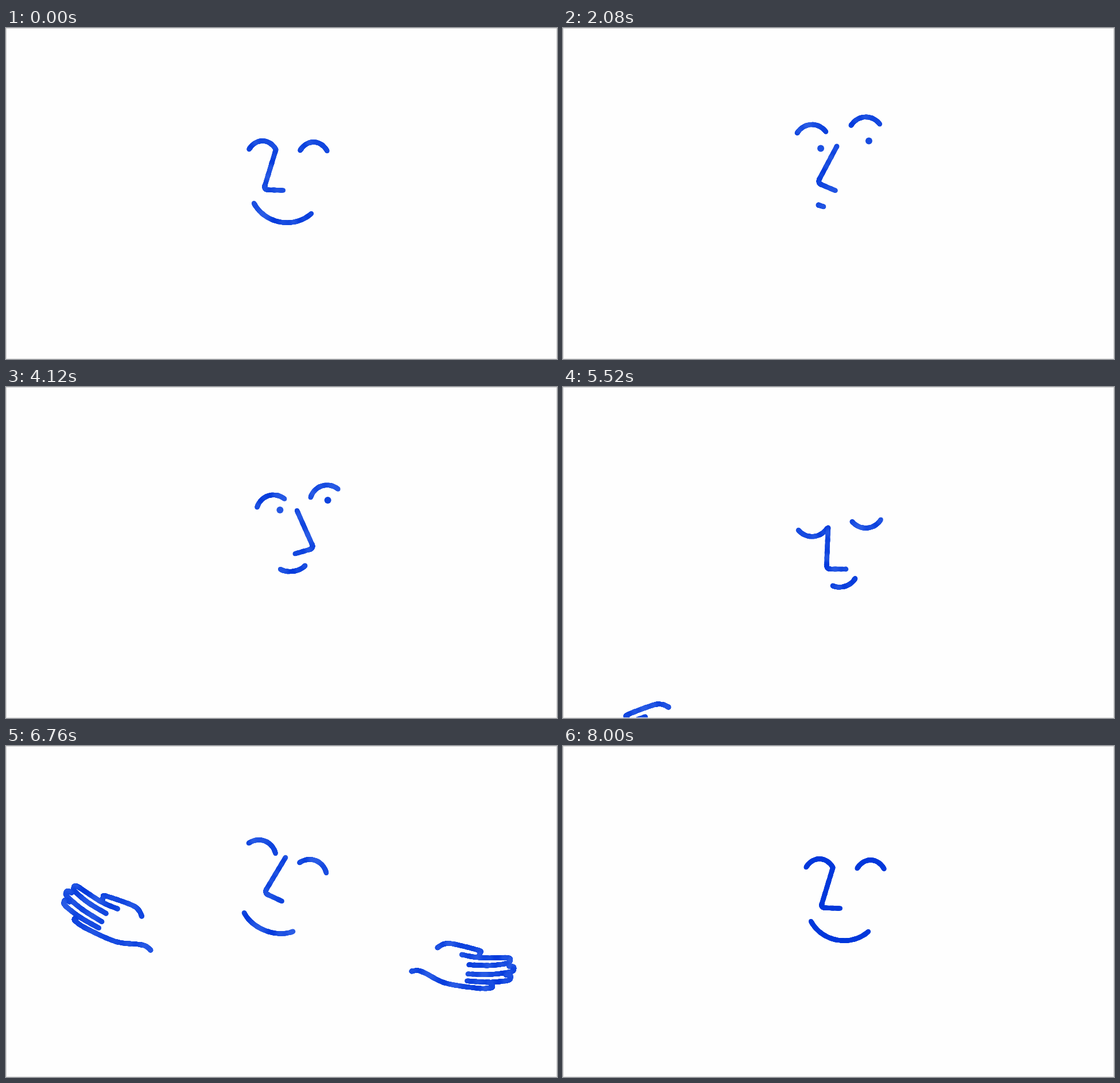
Recreate the animation shown at these times as an HTML page with a canvas. Size 960x576 px, loop 8040 ms.

```html
<!DOCTYPE html>
<html lang="en">
<head>
<meta charset="utf-8">
<title>Smiling face</title>
<style>
html, body { margin: 0; width: 100%; height: 100%; overflow: hidden; background: #fefefe; }
canvas { display: block; }
</style>
</head>
<body>
<canvas id="stage" width="960" height="576"></canvas>
<script>
const LOOP = 8040, TICK = 40, BOIL = 160, FLAT_FROM = 8000;
const PEN = 4.2;
const ctx = document.getElementById('stage').getContext('2d');

const { sin, cos, hypot, PI } = Math;
const rad = deg => deg * PI / 180;
const lerp = (a, b, u) => a + (b - a) * u;
const clamp = u => Math.max(0, Math.min(1, u));
const ramp = (from, to, t) => {
  const u = clamp((t - from) / (to - from));
  return u * u * (3 - 2 * u);
};

// x, y is the point between the brows; nose and mouth are relative to it, angles in degrees
const calm = {
  x: 491.5, y: 212.5, gap: 44.5, roll: 1.3, span: 47, tilt: 1, arch: 20,
  noseX: -21.5, noseY: 0, slant: 17, side: 1, foot: 2,
  mouthX: -9.5, mouthY: 101.5, mouthW: 101.6, mouthTilt: 10.2, smile: 32, open: 0,
  eye: 0, drop: 5
};
const wide = { ...calm, gap: 47.4, span: 50, arch: 18 };
const left = {
  ...wide, x: 480, y: 175, roll: -8, tilt: -2.5, noseX: -3, noseY: 31, slant: 28, foot: 23,
  mouthX: -30.5, mouthY: 134.5, mouthW: 9.5, mouthTilt: 18, smile: 0, eye: 6, drop: 28
};
const right = {
  ...wide, x: 508, y: 193.5, roll: -10.4, tilt: -17, noseX: -1, noseY: 21.5,
  slant: -24, side: -1, foot: 16, mouthX: -8.5, mouthY: 120.5, mouthW: 43.4,
  mouthTilt: -8, smile: 9, eye: 6, drop: 12
};
const bowed = {
  ...wide, x: 482, y: 240, roll: -9, tilt: -4, arch: -17, noseX: -20, noseY: 5, slant: 2.4,
  foot: 0, mouthX: 7.5, mouthY: 99.5, mouthW: 41, mouthTilt: -18, smile: 10
};
const joy = {
  ...wide, x: 486, y: 188, roll: 18.6, tilt: 21, noseX: -5, noseY: -1, slant: 27, foot: 22,
  mouthX: -24.5, mouthY: 120, mouthW: 84.5, mouthTilt: 16.5, smile: 20, open: 1
};
const grin = { mouthW: 91, mouthTilt: 21, smile: 21, open: 0 };
const glad = {
  ...joy, ...grin, x: 490.5, y: 195, roll: 21, noseX: -3.5, slant: 31, foot: 25,
  mouthX: -33, mouthY: 111.5
};
const content = { ...calm, ...grin, mouthX: -34, mouthY: 94 };
const moved = (pose, dx, dy) => ({ ...pose, x: pose.x + dx, y: pose.y + dy });

// [start, end, pose reached, vertical sway on the way]
const moves = [
  [0, 840, calm, 6],
  [880, 1640, moved(right, -6, -18), 8],
  [1760, 2080, left, 10],
  [2080, 2560, left, 2],
  [2600, 3400, moved(right, -11, -22), 5],
  [4000, 4120, right, -6],
  [4120, 4480, content, 8],
  [5280, 5520, bowed, -4],
  [5520, 5880, joy, 10],
  [5880, 6080, moved(joy, 4, 5), 0],
  [6680, 6760, glad, 0],
  [6840, 7200, calm, 6]
];

function faceAt(t) {
  let pose = calm;
  for (const [from, to, next, sway] of moves) {
    if (t < from) break;
    const u = ramp(from, to, t), mixed = {};
    for (const key in next) mixed[key] = lerp(pose[key], next[key], u);
    mixed.y += sway * sin(2 * PI * clamp((t - from) / (to - from)));
    pose = mixed;
  }
  return pose;
}

function cubic(a, b, c, d) {
  return Array.from({ length: 33 }, (_, i) => {
    const u = i / 32, v = 1 - u;
    return [0, 1].map(k =>
      v * v * v * a[k] + 3 * v * v * u * b[k] + 3 * v * u * u * c[k] + u * u * u * d[k]);
  });
}

// Control points of a symmetric arc centred on its chord
function arc(x, y, width, deg, height) {
  const c = cos(rad(deg)), s = sin(rad(deg));
  const at = (along, up) => [x + along * width * c + up * s, y + along * width * s - up * c];
  return [at(-.5, 0), at(-.25, height), at(.25, height), at(.5, 0)];
}

function spline(pts) {
  const pt = i => pts[Math.max(0, Math.min(pts.length - 1, i))];
  return pts.slice(1).flatMap((b, i) => {
    const a = pts[i], p = pt(i - 1), q = pt(i + 2);
    const lead = (from, n0, n1, sign) => from.map((v, k) => v + sign * (n1[k] - n0[k]) / 6);
    return cubic(a, lead(a, p, b, 1), lead(b, a, q, -1), b);
  });
}

function corner(a, b, c) {
  const near = p => {
    const k = 8 / hypot(p[0] - b[0], p[1] - b[1]);
    return [lerp(b[0], p[0], k), lerp(b[1], p[1], k)];
  };
  const p = near(a), q = near(c);
  const pull = from => from.map((v, k) => lerp(v, b[k], 2 / 3));
  return [a, ...cubic(p, pull(p), pull(q), q), c];
}

let seed = 0, flat = false;

// Watercolour blotches that change with every boil
function ink(x, y) {
  if (flat) return 'rgb(3,57,219)';
  const n = sin(x * .13 + seed * 2.1) + sin(y * .17 + x * .06 - seed * 1.7) +
    sin((x - y) * .27 + seed);
  const k = clamp(.55 + n * .22);
  return `rgb(${6 + 36 * k | 0},${60 + 32 * k | 0},${220 + 9 * k | 0})`;
}

function dab(x, y, r) {
  ctx.fillStyle = ink(x, y);
  ctx.beginPath();
  ctx.arc(x, y, r, 0, 2 * PI);
  ctx.fill();
}

function brush(points) {
  let d = 0;
  for (let i = 1; i < points.length; i++) {
    const [ax, ay] = points[i - 1], [bx, by] = points[i];
    const len = hypot(bx - ax, by - ay), steps = Math.max(1, Math.ceil(len));
    for (let s = 0; s <= steps; s++) {
      const u = s / steps, e = d + len * u;
      const rough = .15 * sin(e * .6 + seed * 3) + .1 * sin(e * .31 + seed * 5);
      dab(lerp(ax, bx, u), lerp(ay, by, u), PEN + rough);
    }
    d += len;
  }
}

function drawFace(f) {
  for (const side of [-1, 1]) {
    const x = f.x + side * f.gap * cos(rad(f.roll));
    const y = f.y + side * f.gap * sin(rad(f.roll));
    brush(cubic(...arc(x, y, f.span, f.tilt, f.arch)));
    if (f.eye > .6) dab(x + 11 - side * 5, y + f.drop, f.eye);
  }

  const top = [f.x + f.noseX, f.y + f.noseY];
  const tip = [top[0] - 72 * sin(rad(f.slant)), top[1] + 72 * cos(rad(f.slant))];
  const end = [tip[0] + 34 * f.side * cos(rad(f.foot)), tip[1] + 34 * sin(rad(f.foot))];
  brush(corner(top, tip, end));

  const [a, b, c, d] = arc(f.x + f.mouthX, f.y + f.mouthY, f.mouthW, f.mouthTilt, -f.smile);
  const lift = ([x, y], dx, dy) => [x + dx * f.open, y + dy * f.open];
  brush(cubic(a, lift(b, -9, 0), lift(c, -7, -3), d));
  if (f.open > .02) brush(cubic(a, lift(b, -8, -43), lift(c, -36, -21), lift(d, -8, -13)));
}

// One hand pointing right, around its centre; the left one is its mirror image
function handLines() {
  const thumb = [[-43, -32], [-32, -38], [-16, -38], [28, -26], [31, -21], [28, -14]];
  const index = [[-1, -19], [30, -13], [76, -12]];
  const palm = [[46, 30], [51, 36], [48, 40], [25, 40], [-30, 30], [-65, 12], [-78, 7], [-89, 8]];
  const tips = [[83, -7], [89, 8], [83, 23]], bases = [[11, -1], [9, 15], [7, 27]];
  const fingers = tips.map(([x, y], i) => {
    const [bx, by] = bases[i];
    return [[x - 8, y - 5], [x - 1, y - 4], [x, y], [x - 6, y + 5],
      [(x + bx) / 2, (y + by) / 2 + 5], [bx, by]];
  });
  return [thumb, index, ...fingers, palm].map(spline);
}
const hand = handLines();

function drawHand(side, x, y, turn, bow, t) {
  const low = 1 - ramp(5360, 5820, t) + ramp(6820, 7200, t);
  if (low === 1) return;
  const lift = ramp(6680, 6760, t);
  const cx = x - side * 4.5 * lift - bow * (4 * low * (1 - low) - low / 3);
  const cy = y + 400 * low + 4 * ramp(5880, 6080, t) - 10 * lift;
  const angle = rad(turn + 53 * low - 1.3 * lift), c = cos(angle), s = sin(angle);
  for (const line of hand) {
    brush(line.map(([u, v]) => [cx + side * (u * c - v * s), cy + u * s + v * c]));
  }
}

function drawBorder() {
  ctx.fillStyle = '#cdcdcd';
  ctx.fillRect(0, 0, 960, 1);
  ctx.fillRect(0, 0, 1, 576);
  ctx.fillRect(959, 0, 1, 576);
  ctx.fillStyle = '#dedede';
  ctx.fillRect(0, 575, 960, 1);
}

function draw(t) {
  seed = Math.floor(t / BOIL);
  flat = t >= FLAT_FROM;
  ctx.fillStyle = '#fefefe';
  ctx.fillRect(0, 0, 960, 576);
  drawFace(faceAt(t));
  drawHand(-1, 178.5, 304.5, -33, 61, t);
  drawHand(1, 800, 388, 0, 0, t);
  drawBorder();
}

const start = performance.now();
let shown = -1;
function frame() {
  const t = Math.floor((performance.now() - start) % LOOP / TICK) * TICK;
  if (t !== shown) draw(shown = t);
  requestAnimationFrame(frame);
}
frame();
</script>
</body>
</html>
```
